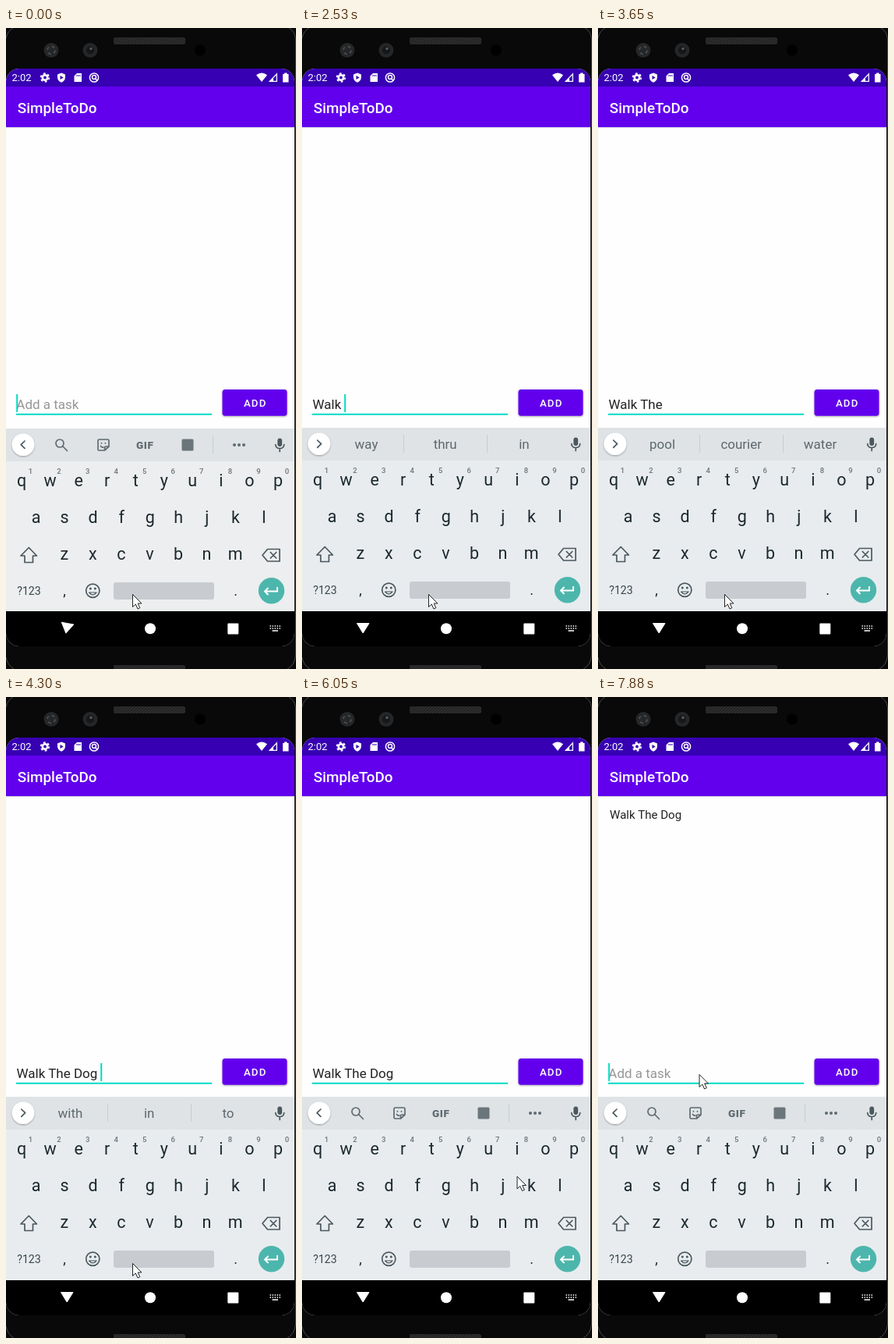
These frames come from a looping animation (372x821 px, 8 s). An HTML page:

```html
<!DOCTYPE html>
<html lang="en">
<head>
<meta charset="utf-8">
<title>To-do app</title>
<style>
  html, body { margin: 0; width: 100%; height: 100%; overflow: hidden; background: #090909; }
  svg { display: block; width: 372px; height: 821px; font-family: Roboto, sans-serif; }
  text { white-space: pre; }
  .mid { text-anchor: middle; }
  .key { font-size: 21.5px; fill: #1c292e; }
  .num { font-size: 9.5px; font-weight: 500; fill: #6a7479; }
  .word { font-size: 17px; fill: #5d686d; }
  .line { fill: none; stroke: #4b585e; stroke-width: 1.7; stroke-linejoin: round; stroke-linecap: round; }
  .soft { stroke: #5f6b70; }
</style>
</head>
<body>
<svg viewBox="0 0 372 821">
  <defs>
    <clipPath id="screen"><rect y="52" width="370" height="740" rx="17"/></clipPath>
    <pattern id="mesh" width="4" height="4" patternUnits="userSpaceOnUse">
      <rect width="4" height="4" fill="#242424"/>
      <path d="M0 4L4 0" stroke="#363636"/>
    </pattern>
    <filter id="drop" x="-20%" y="-20%" width="140%" height="160%">
      <feDropShadow dx="0" dy="1" stdDeviation="1" flood-opacity=".35"/>
    </filter>
  </defs>

  <!-- phone body -->
  <rect width="372" height="821" fill="#090909"/>
  <path d="M0 13Q2 4 9 0M363 0Q370 4 371.5 13V804Q370 816 361 821M0 806Q2 816 10 821" fill="none" stroke="#4a4a4a"/>
  <rect x="138" y="12" width="92" height="9" rx="2" fill="url(#mesh)"/>
  <rect x="138" y="816" width="92" height="9" rx="2" fill="url(#mesh)"/>
  <g fill="#242628">
    <circle cx="58" cy="28.500" r="9.500"/><circle cx="108" cy="28.500" r="9.500"/>
  </g>
  <circle cx="58" cy="28.500" r="5" fill="none" stroke="#484b4d" stroke-width="2" stroke-dasharray="4 3.850"/>
  <circle cx="108" cy="28.500" r="5" fill="#151718"/>
  <circle cx="109" cy="26.500" r="1.800" fill="#55595b"/>
  <circle cx="249" cy="28.500" r="7" fill="#000"/>

  <g clip-path="url(#screen)">
    <rect y="52" width="370" height="740" fill="#fefefe"/>
    <rect y="127" width="370" height="1" fill="#ddd"/>
    <rect y="75" width="370" height="52" fill="#6200ee"/>
    <rect y="52" width="370" height="23" fill="#3700b3"/>
    <text x="7.500" y="68" font-size="13" fill="#fff">2:02</text>
    <!-- status icons -->
    <g fill="#fff">
      <circle cx="50" cy="63.500" r="3.200" fill="none" stroke="#fff" stroke-width="2.600"/>
      <circle cx="50" cy="63.500" r="5.200" fill="none" stroke="#fff" stroke-width="2" stroke-dasharray="2.720"/>
      <path d="M71 57.500L76 59.500V63.500Q75.500 68 71 69.800Q66.500 68 66 63.500V59.500Z"/>
      <path d="M69.500 61V66L73.700 63.500Z" fill="#3700b3"/>
      <path d="M91 58H97V69H87.500V61.500Z"/>
      <path d="M91 60V62M93 60V62M95 60V62" stroke="#3700b3"/>
      <g fill="none" stroke="#fff" stroke-width="1.500">
        <circle cx="113" cy="63.500" r="5.600"/><circle cx="113" cy="63" r="2.500"/><path d="M114 64L117 67.500"/>
      </g>
      <path d="M321 60.200Q328 54.700 335 60.200L328 69Z"/>
      <path d="M347.300 58.800V68.300H338.300Z" fill="none" stroke="#fff" stroke-width="1.300"/>
      <path d="M343 64V69H337.500Z"/>
      <path d="M357 57.500H360.500V59H362.500V69.500H355V59H357Z"/>
    </g>
    <text x="14.800" y="108.500" font-size="18.900" font-weight="500" fill="#fff">SimpleToDo</text>
    <text id="item" x="15" y="156" font-size="15.100" fill="#222">Walk The Dog</text>

    <!-- entry row -->
    <rect x="13" y="493.800" width="251" height="2" fill="#03dac5"/>
    <text id="hint" x="13.300" y="487.500" font-size="17" fill="#969696">Add a task</text>
    <text id="entry" x="13.500" y="487.500" font-size="17" fill="#222"></text>
    <rect id="compose" y="489.500" height="1" fill="#222"/>
    <rect id="caret" width="2" fill="#03dac5"/>
    <rect x="277.500" y="463" width="83" height="33.800" rx="3.500" fill="#6200ee" filter="url(#drop)"/>
    <rect id="press" x="277.500" y="463" width="83" height="33.800" rx="3.500" fill="#fff"/>
    <text x="319.700" y="485" class="mid" font-size="13.200" font-weight="500" letter-spacing="1.180" fill="#fff">ADD</text>

    <!-- keyboard -->
    <g id="board">
      <rect id="base" y="512" width="370" height="236"/>
      <rect y="512" width="370" height="42" fill="#dfe3e6"/>
      <circle cx="22" cy="532.700" r="14.300" fill="#fff" filter="url(#drop)"/>
      <path id="chevron" class="line"/>
      <g id="tools">
        <g class="line soft" stroke-width="2">
          <circle cx="69" cy="531" r="5"/><path d="M73 535L78.500 540.500"/>
          <path d="M119.500 526H130.500Q132 526 132 527.500V535L126.500 540H119.500Q118 540 118 538.500V527.500Q118 526 119.500 526ZM132 535H128Q126.500 535 126.500 537V540"/>
          <path d="M122.500 530.500V531M127.500 530.500V531M121.500 534.500Q123 536.500 125 536"/>
        </g>
        <text x="178.300" y="537.800" class="mid" font-size="13.500" font-weight="900" letter-spacing=".6" fill="#5f6b70">GIF</text>
        <rect x="225.500" y="525.500" width="15" height="15" rx="1.500" fill="#6b767b"/>
        <path d="M265.500 522V544" stroke="#c6cccf"/>
        <g fill="#5f6b70"><circle cx="293" cy="533" r="2"/><circle cx="299" cy="533" r="2"/><circle cx="305" cy="533" r="2"/></g>
      </g>
      <g id="words">
        <path d="M130.500 521V544M237.500 521V544" stroke="#c6cccf"/>
      </g>
      <rect x="348.300" y="524.500" width="5.800" height="10.500" rx="2.900" fill="#4b585e"/>
      <path class="line" d="M345.700 532.500Q346 537.500 351.200 537.500Q356.400 537.500 356.700 532.500M351.200 537.500V541.500"/>
      <g id="keys"></g>
      <path class="line" d="M29.300 664.500L39.500 675H34.500V683.500H24V675H19Z"/>
      <path class="line" d="M335.500 666.500H351V682H335.500L329 674.300ZM339.300 670.500L346.700 678M346.700 670.500L339.300 678"/>
      <text x="29.500" y="725" class="mid" font-size="14.200" fill="#37464c">?123</text>
      <text x="75" y="726" class="mid" font-size="18" fill="#1c292e">,</text>
      <text x="294.500" y="726" class="mid" font-size="18" fill="#1c292e">.</text>
      <circle class="line" cx="111.300" cy="719.800" r="8.600"/>
      <path class="line" d="M106.500 722Q111.300 727.800 116.100 722Z" style="stroke-width:1.200"/>
      <g fill="#4b585e"><circle cx="108.300" cy="717" r="1.500"/><circle cx="114.300" cy="717" r="1.500"/></g>
      <rect x="138" y="709" width="129" height="22" rx="3" fill="#c8ccd0"/>
      <circle cx="340.500" cy="719.700" r="16.700" fill="#4db6ac"/>
      <path d="M348 715V720.500H332.500M336.500 716L332 720.500L336.500 725" fill="none" stroke="#fff" stroke-width="2"/>
    </g>

    <!-- navigation bar -->
    <rect y="747" width="370" height="45" fill="#000"/>
    <path id="back" d="M70.500 762.500H86L78.200 775Z" fill="#fff" stroke="#fff" stroke-linejoin="round"/>
    <circle cx="185" cy="769.300" r="7" fill="#fff"/>
    <rect x="284.300" y="762.500" width="14" height="14" rx="1" fill="#fff"/>
    <g stroke="#fff" stroke-width="1.500" stroke-dasharray="1.500 1.500">
      <path d="M338.500 766H352M338.500 769H352"/><path d="M341.500 772H349" stroke-dasharray="none"/>
    </g>
  </g>

  <path id="mouse" d="M.5 .5V16.500L4.300 13L7 19L9.800 17.700L7.200 12H12Z" fill="#fff" stroke="#222" stroke-linejoin="round"/>
</svg>

<script>
const LOOP = 8000;
const $ = id => document.getElementById(id);
const show = (el, on) => el.setAttribute('visibility', on ? 'visible' : 'hidden');
const set = (el, attrs) => { for (const k in attrs) el.setAttribute(k, attrs[k]); };

function label(parent, x, y, cls, str = '') {
  const el = document.createElementNS('http://www.w3.org/2000/svg', 'text');
  set(el, { x, y, class: cls });
  el.textContent = str;
  return parent.appendChild(el);
}

[['qwertyuiop', 20, 585.5], ['asdfghjkl', 38.5, 632.5], ['zxcvbnm', 74.8, 680]].forEach(([row, x, y], r) =>
  [...row].forEach((ch, i) => {
    const cx = x + i * 36.55;
    label($('keys'), cx, y, 'key mid', ch);
    if (!r) label($('keys'), cx + 11.5, 570, 'num mid', (i + 1) % 10);
  }));
const words = [82.5, 183.7, 285].map(x => label($('words'), x, 539, 'word mid'));

// Each track lists [start time, value...]; a value holds until the next entry.
// Entry: text, index where the word being composed starts (-1 for none).
const typed = [
  [0, '', -1], [1820, 'Wa', 0], [2080, 'Walk', 0], [2530, 'Walk ', -1],
  [2810, 'Walk T', 5], [2950, 'Walk Th', 5], [3100, 'Walk The', 5], [3380, 'Walk The ', -1],
  [3910, 'Walk The D', 9], [4040, 'Walk The Do', 9], [4170, 'Walk The Dog', 9],
  [4300, 'Walk The Dog ', -1], [6900, '', -1]
];
const hints = [
  [0, ''], [1820, 'Was Wait Want'], [2080, 'walk Walk Wall'], [2530, 'way thru in'],
  [2810, 'to The that'], [2950, 'this The that'], [3100, 'Then The They'],
  [3240, 'then The they'], [3380, 'pool courier water'], [3910, 'Day Dog Different'],
  [4040, 'Do Dog Done'], [4170, 'Dogs Dog Doggy'], [4300, 'with in to'], [5070, '']
];
const blink = [
  [0, 1], [380, 0], [770, 1], [1300, 0], [1820, 1], [3650, 0], [3910, 1],
  [5220, 0], [5520, 1], [6050, 0], [6480, 1], [7450, 0], [7880, 1]
];
// A line break pushes the first line up.
const lift = [[0, 0], [4670, 10], [4790, 20.5], [5520, 0]];
const press = [[0, 0], [6760, .18], [6900, .24], [7040, .1], [7180, 0]];
const pointer = [
  [0, 162, 725], [6050, 275.5, 613.5], [6200, 318, 535], [6340, 350, 488], [6480, 337, 480],
  [7180, 326, 485], [7320, 288, 492], [7450, 236, 496], [7590, 182, 492],
  [7730, 141, 485], [7880, 129.5, 483]
];
const settle = [[0, 1, 10], [120, .5, 4], [380, 0, 0]];

const at = (track, t) => track.findLast(step => step[0] <= t).slice(1);

function draw(t) {
  const [text, from] = at(typed, t);
  const [up] = at(lift, t);
  const entry = $('entry');
  if (entry.textContent !== text) entry.textContent = text;
  set(entry, { y: 487.5 - up });
  show($('hint'), !text);
  show($('item'), t >= 6900);

  const width = text ? entry.getComputedTextLength() : 0;
  set($('caret'), { x: 13.2 + (up ? 0 : width), y: up ? 472 : 469, height: up ? 20 : 23 });
  show($('caret'), at(blink, t)[0]);
  show($('compose'), from >= 0);
  if (from >= 0) {
    const start = from && entry.getSubStringLength(0, from);
    set($('compose'), { x: 13.5 + start, width: width - start });
  }

  const [list] = at(hints, t);
  show($('tools'), !list);
  show($('words'), list);
  if (list) list.split(' ').forEach((w, i) => words[i].textContent = w);
  set($('chevron'), { d: list ? 'M19.8 528L24.600 532.700L19.800 537.400' : 'M24 528L19.200 532.700L24 537.400' });

  set($('press'), { opacity: at(press, t)[0] });
  const [drop, turn] = at(settle, t);
  set($('board'), { transform: `translate(0 ${drop})` });
  set($('base'), { fill: drop ? '#eceeef' : '#e8ecef' });
  set($('back'), { transform: `rotate(${turn} 78.2 767)` });
  set($('mouse'), { transform: `translate(${at(pointer, t).join(' ')})` });
}

const begin = performance.now();
function tick() {
  draw((performance.now() - begin) % LOOP);
  requestAnimationFrame(tick);
}
tick();
</script>
</body>
</html>
```
